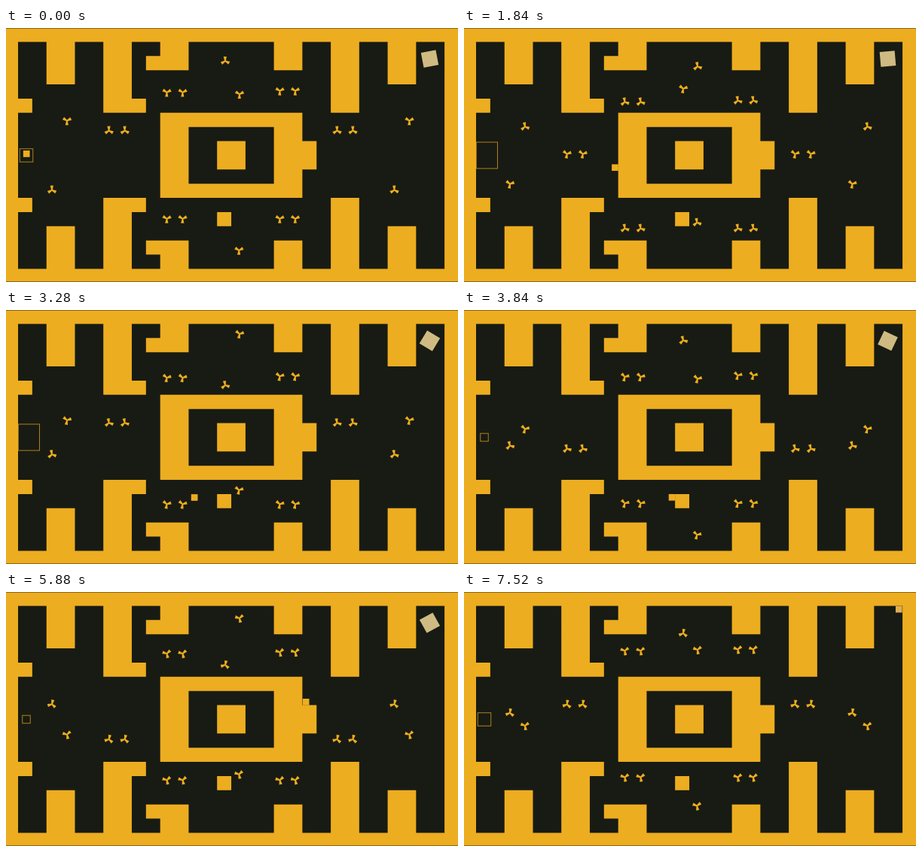
An HTML page with a canvas that plays this animation: 600 by 338 pixels, repeating every 7560 ms.

```html
<!DOCTYPE html>
<html lang="en">
<head>
<meta charset="utf-8">
<title>Maze run</title>
<style>
  html, body { margin: 0; width: 100%; height: 100%; overflow: hidden; background: #181b13; }
  canvas { display: block; width: 600px; height: 338px; }
</style>
</head>
<body>
<canvas id="stage" width="600" height="338"></canvas>
<script>
const ctx = document.getElementById('stage').getContext('2d');
const LOOP = 7560;
const GOLD = '#edad20', DARK = '#181b13', PALE = '#cfbb82';
const CELL = 18.87, LEFT = 16, TOP = 18.5, COLS = 30, ROWS = 16;
const MID = TOP + ROWS * CELL / 2;

const colX = c => LEFT + c * CELL;
const rowY = r => TOP + r * CELL;

function buildWalls() {
  const path = new Path2D();
  const add = (c, r, w, h) => path.rect(colX(c), rowY(r), w * CELL, h * CELL);
  // The maze is the same above and below its middle row
  const both = (c, r, w, h) => { add(c, r, w, h); add(c, ROWS - r - h, w, h); };

  [3, 5, 2].forEach((depth, i) => {
    const c = 2 + i * 4;
    both(c, -1, 2, depth + 1);
    both(COLS - c - 2, -1, 2, depth + 1);
  });
  both(-1, 4, 2, 1);
  both(8, 4, 1, 1);
  both(9, 1, 1, 1);

  both(-1, -1, COLS + 2, 1);
  add(-1, 0, 1, ROWS);
  add(COLS, 0, 1, ROWS);

  both(10, 5, 10, 1);
  add(10, 6, 2, 4);
  add(18, 6, 2, 4);
  add(20, 7, 1, 2);
  add(14, 7, 2, 2);
  add(14, 12, 1, 1);
  return path;
}
const walls = buildWalls();

// Spinners bounce up and down at a steady speed (px per ms)
const groups = {
  side: { span: 94, speed: 0.1075, from: 93 },
  gate: { span: 74, speed: 0.1395, from: 4 },
  hall: { span: 72, speed: 0.1134, from: 58 },
  pair: { span: 28, speed: 0.1613, from: 13 }
};
const twins = (x, gap) => [x, x + gap];
const spinners = [
  { group: 'side', xs: twins(61, 454.5), y: MID, flip: false, spin: -1 },
  { group: 'side', xs: twins(81, 454.5), y: MID, flip: true, spin: 1 },
  { group: 'gate', xs: [...twins(136.7, 21), ...twins(439.5, 21)], y: MID, flip: false, spin: -1 },
  { group: 'hall', xs: [291], y: 66, flip: true, spin: -1 },
  { group: 'hall', xs: [310], y: 66, flip: false, spin: 1 },
  { group: 'hall', xs: [309.3], y: 273.7, flip: false, spin: 1 },
  { group: 'pair', xs: twins(213.5, 21), y: 86.4, flip: false, spin: 1 },
  { group: 'pair', xs: twins(363.5, 20.5), y: 84.5, flip: false, spin: 1 },
  { group: 'pair', xs: [...twins(213.5, 21), ...twins(363.5, 20.5)], y: 254.7, flip: false, spin: 1 }
];

// Turning points of the player: time, x, y
const route = [
  [0, 27, 167.5], [780, 195, 100], [1090, 176, 23], [1420, 195, 100],
  [1840, 200.5, 185.5], [2150, 195, 249.5], [2450, 171.7, 249.5],
  [2860, 171.7, 249.5], [3420, 276, 249.5], [3840, 276, 249.5],
  [3890, 280, 240], [4430, 398, 238], [4760, 426.5, 175.5],
  [5330, 412, 23], [5880, 398, 146.5], [6060, 427, 120],
  [6300, 480, 120], [6640, 552, 78], [6840, 577.3, 23]
];

function playerAt(t) {
  const i = route.findIndex(p => p[0] > t);
  if (i < 0) return route[route.length - 1].slice(1);
  const [t0, x0, y0] = route[i - 1], [t1, x1, y1] = route[i];
  const k = (t - t0) / (t1 - t0);
  return [x0 + (x1 - x0) * k, y0 + (y1 - y0) * k];
}

function bounce(d, span) {
  const m = d % (2 * span);
  return m < span ? m : 2 * span - m;
}

function placed(x, y, deg, paint) {
  ctx.save();
  ctx.translate(x, y);
  ctx.rotate(deg * Math.PI / 180);
  paint();
  ctx.restore();
}

function square(x, y, size, color, deg = 0) {
  placed(x, y, deg, () => {
    ctx.fillStyle = color;
    ctx.fillRect(-size / 2, -size / 2, size, size);
  });
}

function spinner(x, y, deg) {
  placed(x, y, deg, () => {
    ctx.fillStyle = GOLD;
    for (let i = 0; i < 3; i++) {
      ctx.beginPath();
      ctx.moveTo(-0.5, -0.7);
      ctx.lineTo(5.9, -2.1);
      ctx.lineTo(5.9, 2.1);
      ctx.lineTo(-0.5, 0.7);
      ctx.fill();
      ctx.rotate(Math.PI * 2 / 3);
    }
  });
}

// The start marker pulses in steps: small, middle, large, middle
function startRing(t) {
  const p = t % 720;
  const half = p >= 80 && p < 280 ? 5.25 : p >= 380 && p < 600 ? 17.5 : 8.75;
  const x = Math.max(27 - half, LEFT + 0.3);
  ctx.globalAlpha = 0.7;
  ctx.strokeStyle = GOLD;
  ctx.lineWidth = 1;
  ctx.strokeRect(x, MID - half, 27 + half - x, half * 2);
  ctx.globalAlpha = 1;
}

function draw(t) {
  ctx.fillStyle = DARK;
  ctx.fillRect(0, 0, 600, 338);
  startRing(t);
  ctx.fillStyle = GOLD;
  ctx.fill(walls);

  ctx.fillStyle = 'rgba(24, 20, 8, 0.45)';
  ctx.fillRect(0, 0, 600, 1);
  ctx.fillRect(0, 337, 600, 1);

  const angle = 92 + t * 0.222;
  for (const { group, xs, y, flip, spin } of spinners) {
    const { span, speed, from } = groups[group];
    const d = bounce(from + speed * t + (flip ? span : 0), span);
    for (const x of xs) spinner(x, y - span / 2 + d, angle * spin);
  }

  const won = t >= 6760;
  if (!won) square(562.5, 41, 20, PALE, t * 0.15 - 11);
  square(...playerAt(t), 8.7, won ? '#e0af50' : GOLD);
}

function tick() {
  draw(performance.now() % LOOP);
  requestAnimationFrame(tick);
}
tick();
</script>
</body>
</html>
```
